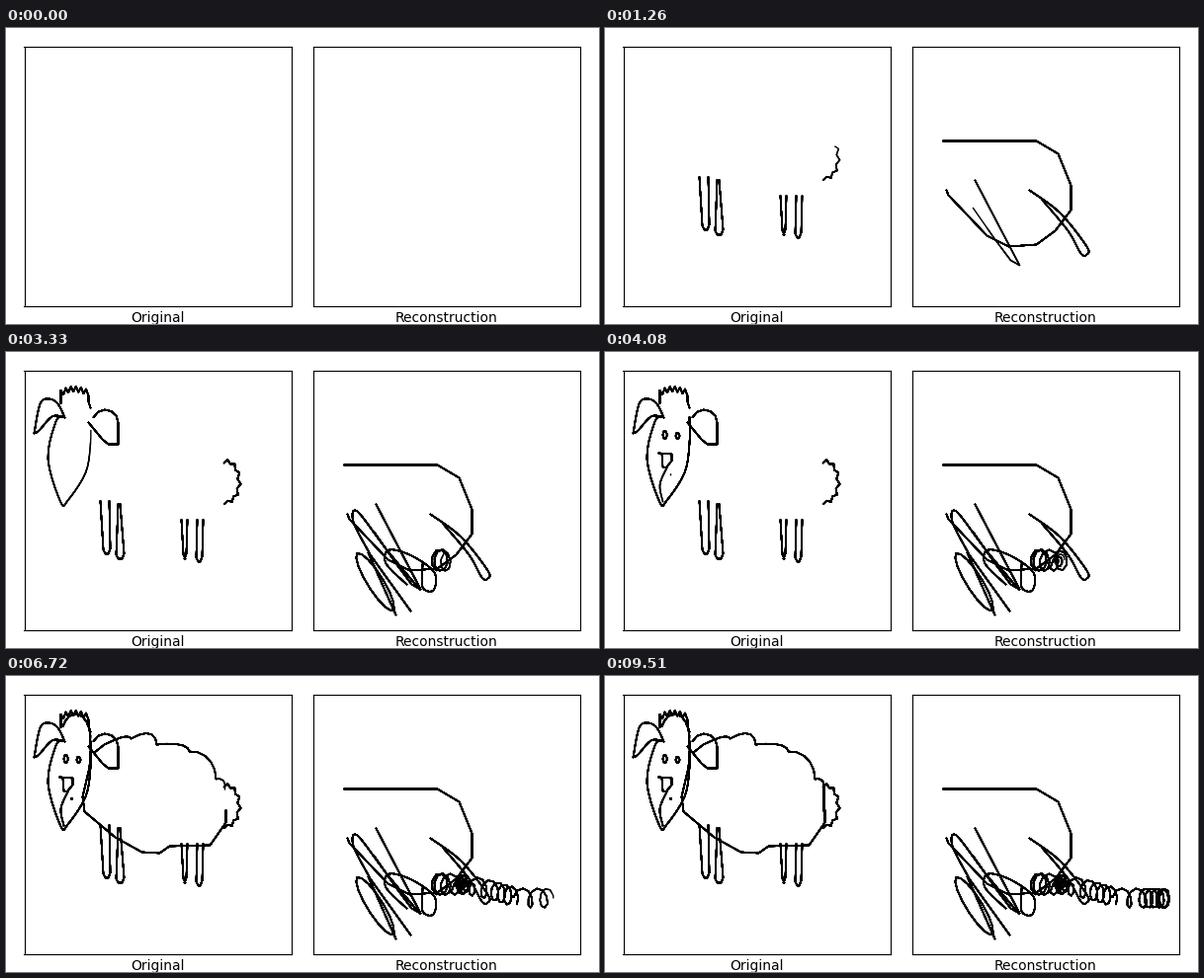
A matplotlib script that plays this animation: 600x300 px, repeating every 9.87 s.

```python
import numpy as np
import matplotlib.pyplot as plt
from matplotlib.animation import FuncAnimation
from matplotlib.collections import LineCollection

W, H, DPI = 600, 300, 100
FRAMES, STEP = 329, 30
KEEP = 20  # every frame inks over the last ones, which darkens the edges
BASE = 18.45

fig = plt.figure(figsize=(W / DPI, H / DPI), dpi=DPI, facecolor="white")


def panel(x, label):
    """Axes whose data units are stage pixels."""
    ax = fig.add_axes([x / W, BASE / H, 270 / W, 263 / H])
    ax.set(xlim=(x - 0.5, x + 269.5), ylim=(299.5 - BASE, 36.5 - BASE),
           xticks=[], yticks=[])
    ax.set_xlabel(label, fontsize=10)
    pen = LineCollection([], colors="black", linewidths=1, zorder=2,
                         capstyle="projecting", joinstyle="round")
    ax.add_collection(pen, autolim=False)
    return ax, pen


ax_left, pen_left = panel(18.51, "Original")
ax_right, pen_right = panel(310.51, "Reconstruction")
for side in ("top", "bottom"):
    ax_left.spines[side].set_bounds(17.6, 288.01)

left, right = [], []


def stroke(store, first, last, pts):
    """Draw a line at constant speed between two frames."""
    pts = np.array(pts, float)
    dist = np.append(0, np.cumsum(np.hypot(*np.diff(pts, axis=0).T)))
    store.append((first, last, pts, dist))


def smooth(*keys, steps=5):
    """Catmull-Rom curve through a few key points."""
    k = np.array([keys[0], *keys, keys[-1]], float)
    t = np.linspace(0, 1, steps, endpoint=False)[:, None]
    parts = [b + t * (c - a) / 2 + t**2 * (a - 2.5 * b + 2 * c - d / 2)
             + t**3 * (1.5 * (b - c) + (d - a) / 2)
             for a, b, c, d in zip(k, k[1:], k[2:], k[3:])]
    return np.vstack([*parts, k[-1:]])


def arc(cx, cy, rx, ry, a0, a1, n, tilt=0, jag=0):
    """Elliptic arc, angles in degrees, with an optional zigzag rim."""
    a, s = np.radians(np.linspace(a0, a1, n)), np.radians(tilt)
    rim = jag * (-1) ** np.arange(n)
    u, v = (rx + rim) * np.cos(a), (ry + rim) * np.sin(a)
    return np.c_[cx + u * np.cos(s) - v * np.sin(s),
                 cy + u * np.sin(s) + v * np.cos(s)]


def leg(x0, x1, top, l, r, low):
    return [(x0, top), (l, low - 4), (l + 2, low), (r - 2, low),
            (r, low - 5), (x1, top)]


def scallop(a, b, puff):
    """Quarter ellipse from a to b, puffed upwards."""
    t = np.linspace(0, 1, 6)
    return np.c_[a[0] + (b[0] - a[0]) * np.sin(t * np.pi / 2),
                 a[1] + (b[1] - a[1]) * (1 - np.cos(t * np.pi / 2))
                 - puff * np.sin(t * np.pi)]


# Sheep: legs, tail and crown
stroke(left, 1, 8, leg(95, 104, 151, 98, 105, 204))
stroke(left, 9, 17, leg(113, 115, 154, 111, 119, 209))
stroke(left, 18, 24, leg(177, 183, 170, 179, 182, 209))
stroke(left, 25, 32, leg(193, 199, 170, 192, 198, 212))
stroke(left, 33, 46, arc(222, 131, 13.5, 21, 95, -98, 14, jag=1.6))

t = np.linspace(0, 1, 12)
teeth = np.c_[55 + 28 * t, 41 - 4 * np.sin(np.pi * t) - 2.8 * (-1) ** np.arange(12)]
stroke(left, 49, 63, [(55, 51), *teeth, (83, 50), (85, 56)])

# Ears and face
stroke(left, 65, 75, [*arc(100, 71, 13, 13, 205, 360, 6), (113, 93), (103, 93),
                      (97, 88), (83, 71)])
stroke(left, 77, 90, [*smooth((57, 65), (46, 65), (33, 79), (28, 82)),
                      *smooth((28, 82), (34, 52), (43, 47), (52, 52), (59, 66))])
stroke(left, 97, 112, smooth((57, 65), (50, 70), (42, 108), (55, 152), (62, 150),
                             (80, 122), (85, 92), (85, 66)))
stroke(left, 113, 117, arc(60.2, 83.5, 2.2, 4, -120, 240, 7))
stroke(left, 118, 122, arc(73, 84.5, 2, 3, -120, 240, 7))
stroke(left, 123, 129, [(54, 102), (67, 103), (67, 110), (61, 117), (58, 116),
                        (57, 103)])
stroke(left, 130, 134, smooth((62, 117), (55, 134), (58, 151)))
stroke(left, 135, 136, [(66, 123.5), (66, 124.2)])
stroke(left, 137, 144, arc(70, 63, 15, 25, 210, 370, 10))

# Cheek, belly and wool
stroke(left, 144, 159, [(85, 76), (84, 92), (77, 122), (79, 137), (110, 163),
                        (137, 178), (155, 179), (165, 172), (206, 171),
                        (222, 148), (222, 136)])
stroke(left, 160, 165, smooth((89, 77), (94, 73), (99, 69)))
knots = [(99, 69), (126, 63), (152, 69), (185, 76), (212, 104), (221, 110)]
wool = [scallop(a, b, puff) for a, b, puff in zip(knots, knots[1:], (6, 7, 2, 1, 1))]
stroke(left, 172, 231, np.vstack([*wool, [(221, 136)]]))

# Round body and slanted legs
stroke(right, 1, 15, [(342, 114), (436, 114), (458, 127), (471, 159), (471, 184),
                      (455, 205), (436, 219), (408, 221), (386, 210),
                      (347, 169), (345, 164)])
stroke(right, 16, 34, smooth((429, 164), (460, 187), (487, 221), (487, 229),
                             (481, 228), (468, 205), (442, 174)))
stroke(right, 35, 42, [(374, 154), (419, 240), (410, 235), (395, 215), (372, 182)])
stroke(right, 43, 52, arc(373, 232.5, 34, 8, 180, -180, 16, tilt=58))
stroke(right, 53, 62, [(409, 262), (368, 205), (366, 203), (394, 266), (367, 205)])
stroke(right, 63, 71, smooth((367, 203), (351, 172), (355, 161), (384, 199), (418, 240)))
stroke(right, 72, 85, smooth((405, 235), (384, 214), (387, 200), (410, 206),
                             (433, 223), (432, 241), (421, 238), (421, 215)))


def coil(n):
    """Pen position on the row of drifting loops."""
    turn = 2 * np.pi * 6 * (n - 175) / 49 + 0.5
    cx = np.interp(n, [86, 100, 116, 156, 175, 200, 216, 246, 263],
                   [437, 441, 459, 465, 493, 513, 543, 564, 566])
    cy = np.interp(n, [86, 156, 175, 205, 263], [210.5, 211, 217, 224.5, 225])
    size = 0.68 + 0.32 * np.cos(0.3 * n) if 112 < n < 158 else 1
    return (cx + np.interp(n, [86, 175], [7.5, 5.5]) * size * np.cos(turn),
            cy + np.interp(n, [86, 175], [11, 9.7]) * size * np.sin(turn))


# The pen lifts once in the row
for a, b in ((86, 200), (203, 263)):
    stroke(right, a, b, [coil(n) for n in range(a, b + 1)])


def inked(store, n):
    """All lines drawn by frame n, as one path with gaps."""
    parts = [np.empty((0, 2))]
    for first, last, pts, dist in store:
        if n > first:
            d = dist[-1] * min(1, (n - first) / (last - first))
            tip = [np.interp(d, dist, pts[:, 0]), np.interp(d, dist, pts[:, 1])]
            parts += [pts[dist < d], [tip], [(np.nan, np.nan)]]
    return np.vstack(parts)


ink = [(pen, [inked(store, n) for n in range(FRAMES)])
       for pen, store in ((pen_left, left), (pen_right, right))]


def update(n):
    for pen, paths in ink:
        pen.set_segments([p for p in paths[max(0, n - KEEP):n + 1] if len(p)])
    return pen_left, pen_right


anim = FuncAnimation(fig, update, frames=FRAMES, interval=STEP,
                     init_func=lambda: update(0), repeat=True, repeat_delay=0)
plt.show()
```
